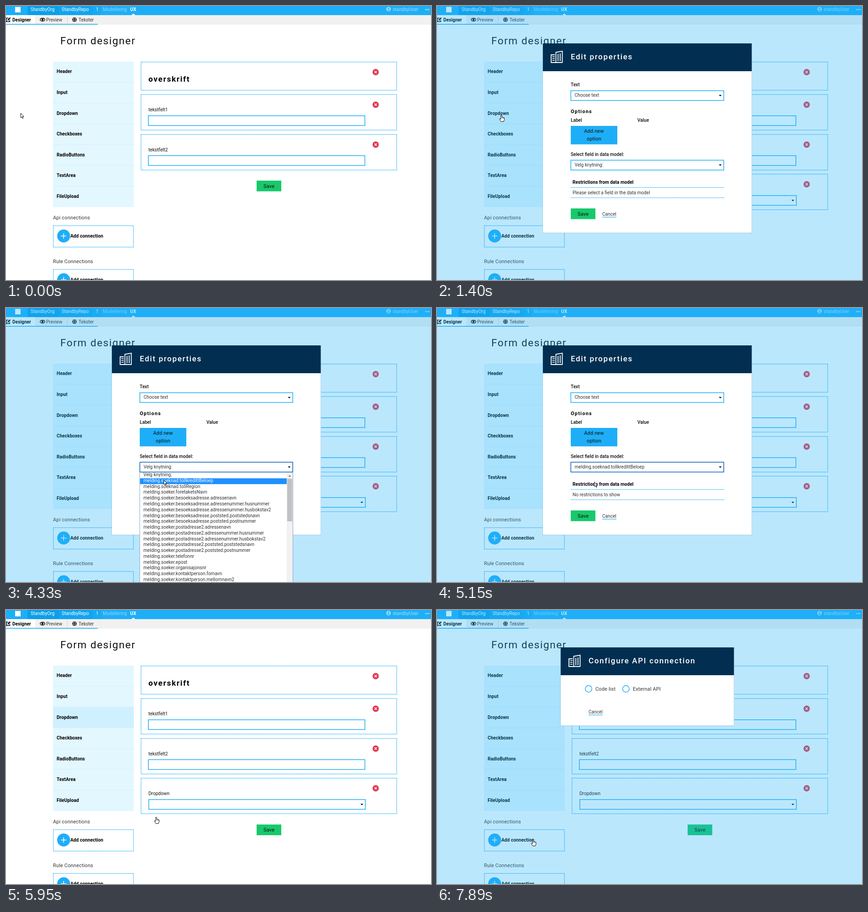
Recreate the animation shown at these times as an HTML page with a canvas. Size 931 by 601 pixels, loop 8000 ms.

```html
<!DOCTYPE html>
<html lang="en">
<head>
<meta charset="utf-8">
<title>Form designer</title>
<style>
  html, body { margin: 0; width: 100%; height: 100%; overflow: hidden; background: #fff; }
  canvas { display: block; width: 931px; height: 601px; }
</style>
</head>
<body>
<canvas id="stage"></canvas>
<script>
const W = 931, H = 601, LOOP = 8000;
const canvas = document.getElementById('stage');
const dpr = window.devicePixelRatio || 1;
canvas.width = W * dpr;
canvas.height = H * dpr;
const c = canvas.getContext('2d');

const BLUE = '#1eaef7', NAVY = '#022f51', GREEN = '#17c96b', RED = '#e23b53',
      PALE = '#e3f7ff', INK = '#111', SOFT = '#333', FOCUS = '#0a62ba';

// name: [weight, size, letter spacing]
const STYLES = {
  body: [400, 10.1, 0], label: [500, 10.1, 0], bold: [700, 10.1, 0.05],
  mid: [400, 11, 0.15], h1: [400, 22.5, 1.6], h2: [700, 17, 1.75],
  title: [500, 17, 1.65], h3: [700, 11, 1.2]
};

function text(s, x, y, style = 'body', color = INK, align = 'left') {
  const [weight, size, gap] = STYLES[style];
  c.font = `${weight} ${size}px Roboto, Inter, sans-serif`;
  c.letterSpacing = gap + 'px';
  c.textAlign = align;
  c.fillStyle = color;
  c.fillText(s, x, y);
}

function rect(x, y, x2, y2, color) {
  c.fillStyle = color;
  c.fillRect(x, y, x2 - x, y2 - y);
}

function frame(x, y, x2, y2, color = BLUE) {
  c.strokeStyle = color;
  c.lineWidth = 1.5;
  c.strokeRect(x + 0.75, y + 0.75, x2 - x - 1.5, y2 - y - 1.5);
}

function disc(x, y, r, color) {
  c.fillStyle = color;
  c.beginPath();
  c.arc(x, y, r, 0, Math.PI * 2);
  c.fill();
}

function ring(x, y, rx, ry, color, width) {
  c.strokeStyle = color;
  c.lineWidth = width;
  c.beginPath();
  c.ellipse(x, y, rx, ry, 0, 0, Math.PI * 2);
  c.stroke();
}

// Each argument after the width is one polyline: [x, y, x, y, ...]
function lines(color, width, ...paths) {
  c.strokeStyle = color;
  c.lineWidth = width;
  c.beginPath();
  for (const p of paths) {
    for (let i = 0; i < p.length; i += 2) c[i ? 'lineTo' : 'moveTo'](p[i], p[i + 1]);
  }
  c.stroke();
}

function poly(color, ...p) {
  c.fillStyle = color;
  c.beginPath();
  for (let i = 0; i < p.length; i += 2) c.lineTo(p[i], p[i + 1]);
  c.fill();
}

function dotted(draw) {
  c.setLineDash([1.5, 1.2]);
  draw();
  c.setLineDash([]);
}

const dottedBox = (...box) => dotted(() => frame(...box));
const dottedLine = y => dotted(() => lines(BLUE, 1.3, [293, y, 629, y]));

function caret(x, y) {
  poly('#000', x - 3, y - 1.5, x + 3, y - 1.5, x, y + 1.8);
}

function select(x, y, x2, label, border) {
  rect(x, y, x2, y + 23, '#fff');
  frame(x, y, x2, y + 23, border);
  caret(x2 - 8.5, y + 11.5);
  text(label, x + 9, y + 14.3, 'body', SOFT);
}

function saveButton(x, y, color = GREEN) {
  rect(x, y, x + 54, y + 23.5, color);
  text('Save', x + 15, y + 15.6, 'mid');
}

function cancelLink(x, y) {
  text('Cancel', x, y, 'body', SOFT);
  rect(x, y + 3, x + 31, y + 4.2, BLUE);
}

function topBar() {
  const faint = 'rgba(255,255,255,.6)';
  rect(0, 0, W, 20, BLUE);
  rect(47, 0, 116, 20, '#0c9fe9');
  rect(116, 0, 190, 20, '#12a4ef');
  rect(190, 0, 208, 20, '#18a9f3');
  rect(20, 2, 32, 14, '#fff');
  text('StandbyOrg', 54, 11, 'body', '#fff');
  text('StandbyRepo', 122, 11, 'body', '#fff');
  text('1', 197, 11, 'body', '#fff');
  text('Modellering', 212, 11, 'body', 'rgba(255,255,255,.5)');
  text('UX', 272, 11, 'bold', '#fff');
  poly('#fff', 275, 20, 279, 16.5, 283, 20);
  disc(838, 7, 5, faint);
  disc(838, 5.6, 1.7, BLUE);
  c.fillStyle = BLUE;
  c.beginPath();
  c.ellipse(838, 10, 3, 2, 0, Math.PI, 0);
  c.fill();
  text('standbyUser', 847, 11, 'body', faint);
  for (const x of [919.5, 923, 926.5]) disc(x, 8, 1.4, faint);
}

function tabs() {
  rect(0, 20, W, 41, '#f1f1f1');
  rect(0, 20, 64, 41, '#fff');
  rect(134, 21, 135, 39, '#d5d5d5');
  rect(0, 39.4, 201, 41, BLUE);
  lines('#000', 1.4, [5.5, 26.5, 0.7, 26.5, 0.7, 34.3, 8.3, 34.3, 8.3, 30.5]);
  lines('#000', 2.4, [3.8, 31.4, 9.3, 25.9]);
  text('Designer', 14, 34, 'bold', '#000');
  ring(80, 30, 5.2, 3.3, '#000', 1.4);
  disc(80, 30, 2.2, '#000');
  text('Preview', 88, 34, 'body', SOFT);
  disc(150, 30, 5, '#000');
  ring(150, 30, 2.2, 5, '#f1f1f1', 0.8);
  lines('#f1f1f1', 0.8, [145, 28.3, 155, 28.3], [145, 31.7, 155, 31.7]);
  text('Tekster', 159, 34, 'body', SOFT);
}

function connection(heading, y, hover) {
  text(heading, 103, y - 13, 'mid', SOFT);
  if (hover) rect(103, y, 280, y + 48.5, PALE);
  dottedBox(103, y, 280, y + 48.5);
  disc(126.3, y + 23.5, 14.2, BLUE);
  lines('#fff', 1.5, [120.3, y + 23.5, 132.3, y + 23.5], [126.3, y + 17.5, 126.3, y + 29.5]);
  text('Add connection', 141, y + 27.3, 'bold', '#000');
}

function sidePanel(activeRow, hoverAdd) {
  const items = ['Header', 'Input', 'Dropdown', 'Checkboxes', 'RadioButtons', 'TextArea', 'FileUpload'];
  rect(103, 122, 280, 441, PALE);
  items.forEach((name, i) => {
    const y = 121.7 + i * 45.6;
    if (activeRow && name === 'Dropdown') rect(103, y, 280, y + 45.6, '#cff0ff');
    if (i) rect(103, y - 0.5, 280, y + 0.5, '#d5eefa');
    text(name, 111, y + 25.6, 'bold', '#000');
  });
  connection('Api connections', 481, hoverAdd);
  connection('Rule Connections', 577, false);
}

function formBox(y, y2) {
  dottedBox(295, y, 856.5, y2);
  const cy = y + 23;
  disc(809.8, cy, 6.9, RED);
  lines('#fff', 1.4, [807.3, cy - 2.5, 812.3, cy + 2.5], [812.3, cy - 2.5, 807.3, cy + 2.5]);
}

function form(withDropdown) {
  formBox(122, 185.5);
  text('overskrift', 312, 166, 'h2', '#000');
  [193.5, 281].forEach((y, i) => {
    formBox(y, y + 79.5);
    text('tekstfelt' + (i + 1), 312, y + 37.7);
    frame(311, y + 46.5, 787, y + 69.5);
  });
  if (withDropdown) {
    formBox(368, 447.5);
    text('Dropdown', 312, 406);
    select(312, 415, 788, '');
  }
  saveButton(549, withDropdown ? 470.5 : 383);
}

function dialog(x, x2, y2, title) {
  rect(0, 0, W, H, 'rgba(30,174,247,.3)');
  rect(x - 0.5, 82, x2 + 0.5, y2 + 0.7, '#79b4d4');
  rect(x, 82, x2, y2, '#fff');
  rect(x, 82, x2, 143, NAVY);
  building(x + 17);
  text(title, x + 61, 117.3, 'title', '#fff');
}

function building(x) {
  lines('#fff', 1.8,
    [x + 9, 107, x + 1, 107, x + 1, 124, x + 26, 124],
    [x + 11.5, 124, x + 11.5, 101.5, x + 25.5, 99, x + 25.5, 124],
    [x + 16.2, 105, x + 16.2, 121], [x + 20.8, 104, x + 20.8, 121]);
  lines('#fff', 1.6, [x + 3.5, 111, x + 9, 111], [x + 3.5, 115, x + 9, 115], [x + 3.5, 119, x + 9, 119]);
}

function propertiesDialog(s) {
  dialog(232, 689.5, 497.5, 'Edit properties');
  text('Text', 293, 176.4, 'label');
  select(292.5, 185, 629, 'Choose text');
  text('Options', 293, 234.5, 'h3', '#000');
  text('Label', 293, 254, 'label');
  text('Value', 439, 254, 'label');
  rect(293, 263, 395, 303.5, BLUE);
  text('Add new', 344, 278, 'mid', INK, 'center');
  text('option', 344, 295.3, 'mid', INK, 'center');
  text('Select field in data model:', 293, 328.7, 'label');
  select(292.5, 337.5, 629, s.chosen ? 'melding.soeknad.tollkredittBeloep' : 'Velg knytning:', s.focus ? FOCUS : BLUE);
  text('Restrictions from data model', 297, 389.7, 'bold', '#000');
  dottedLine(398);
  text(s.chosen ? 'No restrictions to show' : 'Please select a field in the data model', 297, 412.6, 'body', SOFT);
  dottedLine(420.5);
  saveButton(293, 444, s.hoverSave ? '#45d489' : GREEN);
  cancelLink(362, 459.5);
  if (s.open) fieldList(s.row);
}

function fieldNames() {
  const address = (key, streets) => [
    ...streets, 'adressenummer.husnummer', 'adressenummer.husbokstav2',
    'poststed.poststedsnavn', 'poststed.postnummer'
  ].map(part => `soeker.${key}.${part}`);
  return ['Velg knytning:', ...[
    'soeknad.tollkredittBeloep', 'soeknad.tollRegion', 'soeker.foretaketsNavn',
    ...address('besoeksadresse', ['adressenavn']),
    ...address('postadresse2', ['adressenavn']),
    'soeker.telefonnr', 'soeker.epost', 'soeker.organisajonsnr',
    'soeker.kontaktperson.fornavn', 'soeker.kontaktperson.mellomnavn2'
  ].map(n => 'melding.' + n)];
}

const FIELDS = fieldNames();

function fieldList(active) {
  rect(292.5, 360.5, 629, H, '#7fa6c8');
  rect(293.5, 361, 628, H, '#fff');
  FIELDS.forEach((name, i) => {
    const y = 360.8 + i * 12.76;
    if (i === active) rect(293.5, y, 615, y + 12.76, '#1e90ff');
    text(name, 301, y + 8.4, 'body', i === active ? '#fff' : SOFT);
  });
  rect(615, 361, 628, H, '#f1f1f1');
  rect(616, 374.5, 627, 468, '#c1c1c1');
  poly('#777', 618.5, 370, 621.5, 366.5, 624.5, 370);
}

function apiDialog() {
  dialog(271, 650.5, 253.5, 'Configure API connection');
  ring(332, 173, 7.2, 7.2, BLUE, 1.5);
  text('Code list', 347, 177.2, 'mid', SOFT);
  ring(413.8, 173, 7.2, 7.2, BLUE, 1.5);
  text('External API', 429, 177.2, 'mid', SOFT);
  cancelLink(332, 226.6);
}

// Pointer moves: start, end, number of steps, destination, and where it becomes a hand
const MOVES = [
  { t0: 460, t1: 820, n: 6, x: 141, y: 238.5, hand: x => x > 103 },
  { t0: 1250, t1: 1250, n: 1, x: 141, y: 239, hand: () => true },
  { t0: 2080, t1: 2600, n: 8, x: 333, y: 349, hand: (x, y) => y > 337 },
  { t0: 3860, t1: 4010, n: 3, x: 345.7, y: 367.5, hand: (x, y) => y < 360 },
  { t0: 4170, t1: 4330, n: 4, x: 345.7, y: 377.3, hand: () => false },
  { t0: 5150, t1: 5630, n: 7, x: 329, y: 454, hand: (x, y) => y > 444 },
  { t0: 7610, t1: 7740, n: 3, x: 210.5, y: 503, hand: (x, y) => x < 280 && y > 481 }
];

function pointerAt(t) {
  let p = { x: 32.3, y: 235, hand: false };
  for (const m of MOVES) {
    if (t < m.t0) break;
    const gap = (m.t1 - m.t0) / Math.max(1, m.n - 1);
    const step = t >= m.t1 ? m.n : Math.floor((t - m.t0) / gap) + 1;
    const k = step / m.n, e = k * k * (3 - 2 * k);
    const x = p.x + (m.x - p.x) * e, y = p.y + (m.y - p.y) * e;
    p = { x, y, hand: m.hand(x, y) };
  }
  return p;
}

const ARROW = new Path2D('M0 0V10L2.3 8L3.9 11.8L5.5 11.1L3.9 7.5H6.8Z');
const HAND = new Path2D('M-1.2 1Q0 -.5 1.2 1V5Q2.5 4.3 3.2 5.4Q4.5 4.8 5 6Q6.5 5.6 6.5 7.2V10L5 14.5H-.8' +
  'L-3.8 9.4Q-4.3 8 -3 8L-1.2 9.5Z');

function drawPointer(p) {
  const shape = p.hand ? HAND : ARROW;
  c.save();
  c.translate(p.x, p.y);
  c.lineJoin = 'round';
  c.lineWidth = 1;
  c.fillStyle = '#fff';
  c.strokeStyle = '#111';
  c.fill(shape);
  c.stroke(shape);
  if (p.hand) lines('#111', 0.7, [1.2, 5, 1.2, 7.5], [3.2, 5.6, 3.2, 7.8], [5, 6.2, 5, 8]);
  c.restore();
}

function render(t) {
  const p = pointerAt(t);
  const between = (a, b) => t >= a && t < b;
  const editing = between(1400, 5950), api = t >= 7890;
  c.setTransform(dpr, 0, 0, dpr, 0, 0);
  rect(0, 0, W, H, '#fff');
  topBar();
  tabs();
  text('Form designer', 119, 84, 'h1');
  sidePanel(t < 1400 && p.hand || between(5950, 7610), between(7610, 7890) && p.hand);
  form(t >= 1400);
  if (editing) {
    propertiesDialog({
      open: between(2600, 4630),
      focus: between(2600, 5780),
      chosen: t >= 4630,
      row: p.y > 373.5 ? 1 : 0,
      hoverSave: t >= 5150 && p.hand
    });
  }
  if (api) apiDialog();
  drawPointer(p);
}

function tick() {
  render(performance.now() % LOOP);
  requestAnimationFrame(tick);
}
tick();
</script>
</body>
</html>
```
